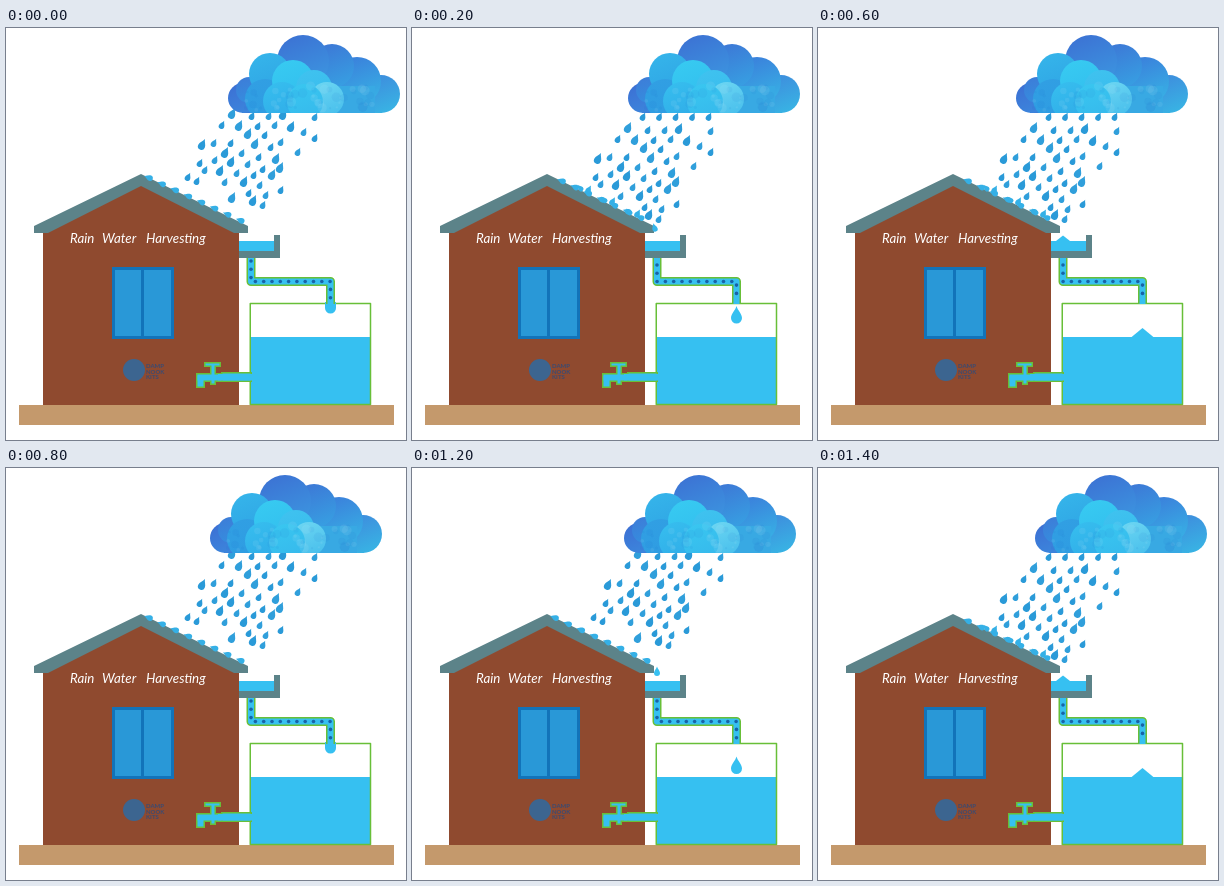
An HTML page with a canvas that plays this animation: 400x412 px, repeating every 1600 ms.

```html
<!DOCTYPE html>
<html lang="en">
<head>
<meta charset="utf-8">
<title>Rain Water Harvesting</title>
<style>
html, body { margin: 0; width: 100%; height: 100%; overflow: hidden; background: #fff; }
canvas { display: block; width: 400px; height: 412px; }
</style>
</head>
<body>
<canvas id="stage" width="400" height="412"></canvas>
<script>
const ctx = document.getElementById('stage').getContext('2d');
const STEP = 200, STEPS = 8;
const WATER = '#36c0f1', GREEN = '#68bf38', STEEL = '#5c8389', BRICK = '#8f4a2f';
const cloudShift = [0, -6, -14, -24, -18, -13, -10, -5];

// Falling drops, x and y pairs
const rain = [
  226,86, 246,88, 263,88, 277,87, 309,89, 216,97, 233,98, 252,98, 269,97, 285,99,
  298,104, 309,110, 242,106, 259,107, 275,114, 196,117, 208,115, 225,115, 249,116,
  265,119, 292,124, 219,125, 236,125, 253,129, 270,131, 194,135, 209,132, 225,134,
  242,136, 257,141, 274,140, 182,149, 199,142, 214,143, 231,145, 248,147, 266,147,
  191,153, 219,154, 238,154, 254,157, 275,162, 226,170, 243,165, 260,167, 247,173, 257,177
];

function rect(x, y, w, h, color) {
  ctx.fillStyle = color;
  ctx.fillRect(x, y, w, h);
}

function poly(points, color) {
  ctx.beginPath();
  points.forEach(([x, y]) => ctx.lineTo(x, y));
  ctx.closePath();
  ctx.fillStyle = color;
  ctx.fill();
}

function line(points, width, color) {
  ctx.beginPath();
  points.forEach(([x, y]) => ctx.lineTo(x, y));
  ctx.lineWidth = width;
  ctx.strokeStyle = color;
  ctx.stroke();
}

function disc(x, y, r, color) {
  ctx.beginPath();
  ctx.arc(x, y, r, 0, Math.PI * 2);
  ctx.fillStyle = color;
  ctx.fill();
}

// Teardrop with its round part at x, y and its tip 2.2 radii away
function drop(x, y, r, angle, color) {
  ctx.save();
  ctx.translate(x, y);
  ctx.rotate(angle);
  ctx.beginPath();
  ctx.moveTo(0, -2.2 * r);
  ctx.bezierCurveTo(0.2 * r, -1.4 * r, r, -0.8 * r, r, 0);
  ctx.arc(0, 0, r, 0, Math.PI);
  ctx.bezierCurveTo(-r, -0.8 * r, -0.2 * r, -1.4 * r, 0, -2.2 * r);
  ctx.fillStyle = color;
  ctx.fill();
  ctx.restore();
}

function puff(x, y, r, top, bottom) {
  const g = ctx.createLinearGradient(x - r * 0.4, y - r, x + r * 0.4, y + r);
  g.addColorStop(0, top);
  g.addColorStop(1, bottom);
  disc(x, y, r, g);
}

function drawCloud(dx) {
  ctx.save();
  ctx.translate(dx, 0);
  ctx.beginPath();
  ctx.rect(220, 0, 180, 85);
  ctx.clip();
  const base = ctx.createLinearGradient(236, 0, 376, 0);
  base.addColorStop(0, '#3b7ad8');
  base.addColorStop(0.5, '#36a6e6');
  base.addColorStop(1, '#3bb4e4');
  rect(236, 55, 140, 30, base);
  puff(375, 66, 19, '#3e8cdd', '#38b4e4');
  puff(351, 53, 24, '#3b7fdb', '#37b2e5');
  puff(326, 38, 22, '#3d78d6', '#379fe2');
  puff(297, 33, 26, '#3c73d4', '#3c96e0');
  rect(305, 58, 64, 27, '#38a9e3');
  puff(237, 70, 15, '#3c70d4', '#3c86dc');
  puff(243, 62, 13, '#3d7dd8', '#348fdf');
  puff(264, 46, 21, '#35b4ea', '#2fa4e4');
  puff(259, 71, 20, '#319fe3', '#2e9ce2');
  puff(287, 53, 21, '#37caf1', '#33bdee');
  puff(308, 60, 18, '#3fc2ef', '#38bbed');
  puff(276, 73, 19, '#36bdee', '#30ace8');
  puff(321, 71, 17, '#6bd5f2', '#48bfec');
  puff(299, 74, 18, '#39c6f0', '#36b9ec');

  // Soft watercolour mottling
  let seed = 7;
  const rnd = () => (seed = (seed * 16807) % 2147483647) / 2147483647;
  ctx.globalAlpha = 0.07;
  for (let i = 0; i < 50; i++) {
    disc(240 + rnd() * 132, 58 + rnd() * 24, 1 + rnd() * 4, i % 2 ? '#fff' : '#1d62c8');
  }
  ctx.restore();
}

function drawRain(odd) {
  const dx = odd ? -10 : 0, dy = odd ? 14 : 0;
  for (let i = 0; i < rain.length; i += 2) {
    const x = rain[i] + dx, y = rain[i + 1] + dy;
    const roofY = 146 + (x - 135) * 0.486;
    if (x < 241 && y > roofY - 2) continue;
    const r = i % 6 === 0 ? 3.6 : 2.8;
    drop(x - 0.5, y + 1.2, r, 0.45, i % 4 ? '#2a9ad8' : '#309fdb');
  }
  if (odd) {
    for (let x = 231; x < 300; x += 16.5) drop(x - 0.5, 90, 2.8, 0.45, '#2a9ad8');
  }
}

function drawRoofDrops(odd) {
  const start = odd ? 150 : 143;
  for (let x = start; x < 240; x += 13.1) {
    const y = 146.5 + (x - 135) * 0.465;
    drop(x + 1, y, 2.8, -1.2, '#35b0e6');
  }
  if (odd) {
    for (const x of [172, 196, 221]) {
      const y = 146 + (x - 135) * 0.486;
      drop(x - 3, y - 3, 2.5, -0.7, '#35b0e6');
      drop(x + 4, y - 1, 2.8, 0.5, '#35b0e6');
    }
  }
}

function drawHouse() {
  poly([[37, 203], [135, 153], [233, 203], [233, 377], [37, 377]], BRICK);
  poly([[135, 146], [242, 198], [242, 205], [228, 205], [135, 158],
        [42, 205], [28, 205], [28, 198]], STEEL);

  ctx.fillStyle = '#fff';
  ctx.font = 'italic 13.3px Lato, "Open Sans", sans-serif';
  ctx.fillText('Rain', 64, 215);
  ctx.fillText('Water', 96, 215);
  ctx.fillText('Harvesting', 140, 215);

  rect(106, 239, 62, 72, '#1273b9');
  rect(109, 242, 26, 66, '#2998d7');
  rect(138, 242, 27, 66, '#2998d7');

  disc(128, 342, 11, '#3c6590');
  ctx.fillStyle = '#3b4b72';
  ctx.font = 'bold 6px Lato, sans-serif';
  ['DAMP', 'NOOK', 'KITS'].forEach((s, i) => ctx.fillText(s, 140, 340 + i * 5.7));
}

function drawGutter(phase) {
  rect(233, 213, 35, 10, WATER);
  rect(233, 223, 41, 7, STEEL);
  rect(268, 207, 6, 23, STEEL);
  if (phase === 1) drop(243, 201, 2.7, -0.3, '#35b5ea');
  if (phase === 2) drop(245, 205, 3, 0, WATER);
  if (phase === 3) poly([[238, 213], [245, 207.5], [252, 213]], WATER);
}

function drawPipe(odd) {
  const path = [[245, 230], [245, 253.5], [324.5, 253.5], [324.5, 276]];
  ctx.lineJoin = 'round';
  line(path, 9, GREEN);
  line(path, 6, WATER);
  for (let d = odd ? 7 : 3; d < 122; d += 8.3) {
    const x = 245 + Math.min(Math.max(d - 23.5, 0), 79.5);
    const y = 230 + Math.min(d, 23.5) + Math.max(d - 103, 0);
    disc(x, y, 1.8, '#1763a8');
  }
}

function drawTank(phase) {
  rect(245, 309, 119, 67, WATER);
  ctx.lineWidth = 1.5;
  ctx.strokeStyle = GREEN;
  ctx.strokeRect(244.25, 275.5, 120.25, 101);
  if (phase === 0) {
    rect(319, 274, 11, 6, WATER);
    disc(324.5, 280, 5.5, WATER);
  }
  if (phase === 1) drop(324.5, 290, 5.5, 0, WATER);
  if (phase === 2) drop(324.5, 300.5, 5.5, 0, WATER);
  if (phase === 3) poly([[313, 309.5], [324.5, 300], [336, 309.5]], WATER);
}

function drawTap() {
  const parts = [[215, 344, 31, 10], [198, 334, 17, 5], [204, 335, 6, 22],
                 [190, 345, 27, 9], [190, 346, 9, 14]];
  parts.forEach(([x, y, w, h]) => rect(x, y, w, h, GREEN));
  parts.forEach(([x, y, w, h]) => rect(x + 1.5, y + 1.5, w - 3, h - 3, WATER));
  rect(212, 346, 35, 6.5, WATER);
}

function draw(step) {
  const odd = step % 2 === 1, phase = step % 4;
  rect(0, 0, 400, 412, '#fff');
  rect(13, 377, 375, 20, '#c4996c');
  drawRain(odd);
  drawCloud(cloudShift[step]);
  drawHouse();
  drawRoofDrops(odd);
  drawGutter(phase);
  drawTank(phase);
  drawPipe(odd);
  drawTap();
}

function tick() {
  draw(Math.floor(performance.now() / STEP) % STEPS);
  requestAnimationFrame(tick);
}
tick();
</script>
</body>
</html>
```
